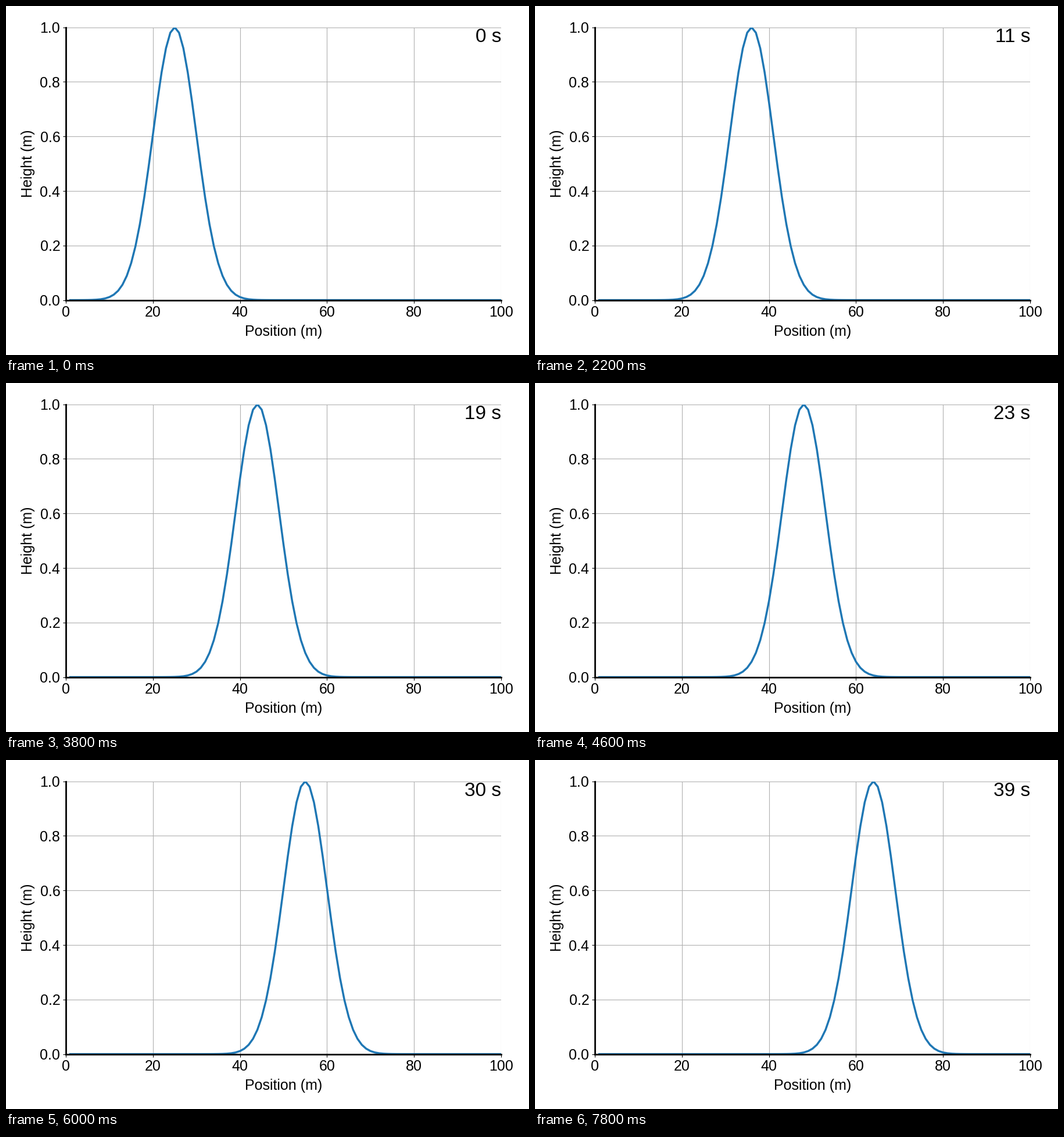
These frames come from a looping animation (900 px wide and 600 px high, 8000 ms). A matplotlib script:

```python
import numpy as np
import matplotlib.pyplot as plt
from matplotlib.animation import FuncAnimation

W, H, DPI = 900, 600, 100
LEFT, RIGHT, TOP, BOTTOM = 103.0, 852.0, 36.6, 505.6
START, SPEED, SIGMA = 25, 1, 5
STEPS, STEP_MS = 40, 200

plt.rcParams.update({
    "font.family": "Liberation Sans",
    "font.size": 18,
    "axes.linewidth": 2,
    "toolbar": "None",
})

fig = plt.figure(figsize=(W / DPI, H / DPI), dpi=DPI, facecolor="white")
ax = fig.add_axes([LEFT / W, 1 - BOTTOM / H,
                   (RIGHT - LEFT) / W, (BOTTOM - TOP) / H])
ax.set_xlim(0, 100)
ax.set_ylim(0, 1)
ax.set_xticks(np.arange(0, 101, 20))
ax.set_yticks(np.linspace(0, 1, 6))
ax.grid(True, color="#b0b0b0", linewidth=0.8)
ax.spines[["top", "right"]].set_visible(False)


def label(x, y, text, **style):
    """Place text by its baseline, in pixels from the top left."""
    return fig.text(x / W, 1 - y / H, text, va="baseline", **style)


label(478, 566.5, "Position (m)", ha="center")
fig.text(45.5 / W, 1 - 271 / H, "Height (m)", rotation=90,
         rotation_mode="anchor", ha="center", va="baseline")
clock = label(852.5, 62.5, "", ha="right", fontsize=24)

x = np.arange(1, 101)
wave, = ax.plot([], [], color="#1f77b4", linewidth=2.5)


def update(t):
    center = START + SPEED * t
    wave.set_data(x, np.exp(-0.5 * ((x - center) / SIGMA) ** 2))
    clock.set_text(f"{t} s")
    return wave, clock


anim = FuncAnimation(fig, update, frames=STEPS, init_func=lambda: update(0),
                     interval=STEP_MS, repeat=True, repeat_delay=0)
plt.show()
```
